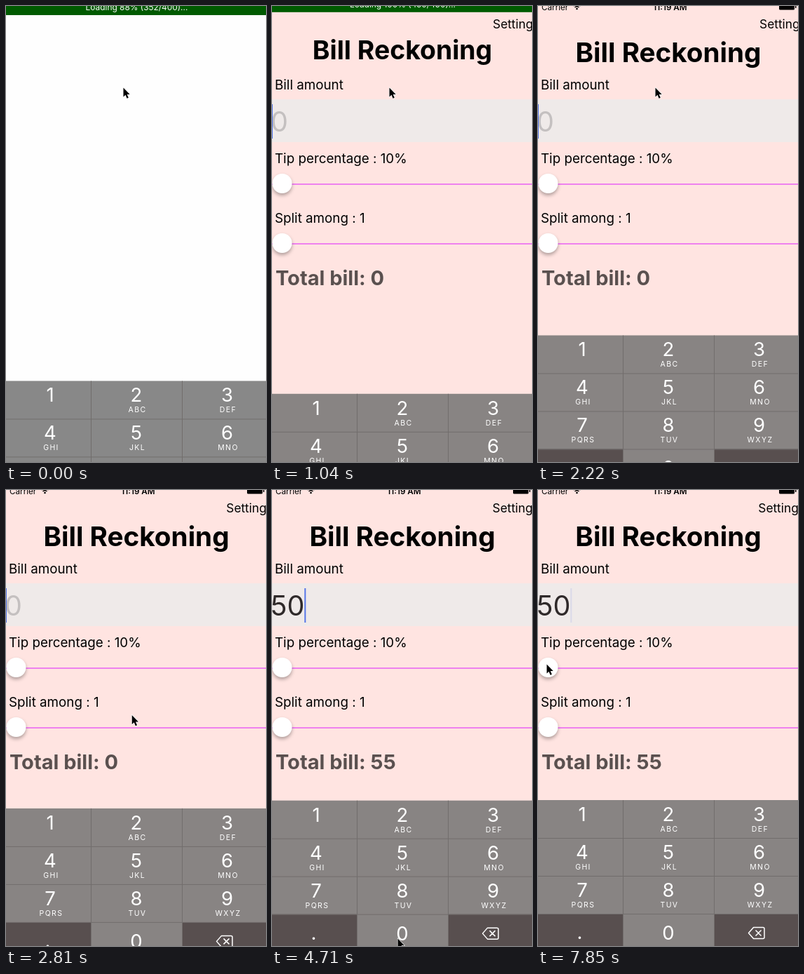
Animation, 371 px wide and 650 px high, one loop 8 s. Source, as an HTML page:

```html
<!DOCTYPE html>
<html lang="en">
<head>
<meta charset="utf-8">
<title>Bill Reckoning</title>
<style>
  html, body { margin: 0; width: 100%; height: 100%; overflow: hidden; background: #fefefe; }
  svg { display: block; width: 371px; height: 650px; font-family: Inter, Roboto, sans-serif; }
  .label { font-size: 18.8px; }
  .thumb { fill: #fff; filter: drop-shadow(0 3px 2.5px rgba(0, 0, 0, .3)); }
  .digit { font-size: 27.5px; fill: #fff; text-anchor: middle; }
  .letters { font-size: 10.5px; letter-spacing: 1.4px; fill: #fff; text-anchor: middle; }
</style>
</head>
<body>
<svg viewBox="0 0 371 650">
  <rect width="371" height="650" fill="#fefefe"/>
  <g id="page">
    <rect width="371" height="650" fill="#ffe4e1"/>
    <g font-size="11.7">
      <text x="5" y="5.5">Carrier</text>
      <text x="188.5" y="5.5" font-weight="600" text-anchor="middle">11:19 AM</text>
      <path d="M50.5 0Q55.5 -4 60.5 0M52.5 2Q55.5 -.5 58.5 2" fill="none" stroke="#000" stroke-width="1.5"/>
      <circle cx="55.5" cy="4" r="1.3"/>
      <rect x="344" y="-4" width="22" height="9.5" rx="1.5"/>
      <rect x="367" y="-1" width="1.5" height="4"/>
    </g>
    <text id="settings" y="32" font-size="17.3">Settings</text>
    <text id="title" text-anchor="middle" font-size="38.7" font-weight="700">Bill Reckoning</text>
    <text class="label" x="4" y="118.5">Bill amount</text>
    <rect y="133" width="371" height="61" fill="#efeae9"/>
    <text id="amount" x="-2" y="178.5" font-size="39.5"></text>
    <rect id="caret" y="140" width="2" height="49" fill="#5677e8"/>
    <text class="label" x="4" y="223.5">Tip percentage : 10%</text>
    <text class="label" x="4" y="308.5">Split among : 1</text>
    <g id="sliders"></g>
    <text id="total" x="5" y="398" font-size="29" font-weight="700" fill="#5a504f"></text>
  </g>
  <g id="loading">
    <rect y="-20" width="371" height="33" fill="#005a00"/>
    <text id="progress" x="186.5" y="6.3" font-size="11.9" fill="#fff" text-anchor="middle"></text>
  </g>
  <g id="keyboard"></g>
  <path id="cursor" d="M.5 1.5V14.5L3.5 11.8L5.6 16.8L7.8 15.8L5.7 11H9.7Z" stroke="#fff" stroke-width="1.2" paint-order="stroke"/>
</svg>
<script>
const $ = id => document.getElementById(id);
const DURATION = 8000, DISMISS = -800, MOUNT = 386, FIRST_KEY = 4050, SECOND_KEY = 4550;

$('sliders').innerHTML = [254, 339].map(y =>
  `<rect y="${y - 1}" width="371" height="2" fill="#ee82ee"/>
   <circle class="thumb" cx="14.5" cy="${y - 1}" r="14"/>`).join('');

function buildKeyboard() {
  const centers = [63, 186, 315.5];
  const letters = ['', 'ABC', 'DEF', 'GHI', 'JKL', 'MNO', 'PQRS', 'TUV', 'WXYZ'];
  const keys = letters.map((word, i) => {
    const x = centers[i % 3], y = Math.floor(i / 3) * 54;
    return `<text class="digit" x="${x}" y="${y + 30}">${i + 1}</text>
            <text class="letters" x="${x + 1.5}" y="${y + 45}">${word}</text>`;
  }).join('');
  $('keyboard').innerHTML = `
    <rect id="keys" width="371" height="216"/>
    <path d="M0 162H121.5V216H0ZM251.5 162H371V216H251.5Z" fill="#584f4f"/>
    <path d="M0 54.5H371M0 108.5H371M0 162.5H371M121.5 0V216M251.5 0V216" stroke="#716d6c"/>
    ${keys}
    <text class="digit" x="59.5" y="198">.</text>
    <text class="digit" x="186" y="199">0</text>
    <path d="M300.5 189.5L307.5 181.5H321Q323 181.5 323 183.5V195.5Q323 197.5 321 197.5H307.5ZM310.5 185.5L318.5 193.5M318.5 185.5L310.5 193.5"
      fill="none" stroke="#fff" stroke-width="1.5" stroke-linejoin="round"/>`;
}

// Pointer stops: time, x, y
const stops = [
  [0, 167, 115], [2450, 167, 115], [3100, 188, 466], [3600, 188, 466],
  [3900, 183, 520], [4130, 183, 520], [4480, 179, 638], [4850, 179, 638],
  [5750, 150, 325], [7020, 150, 325], [7500, 7, 250], [7750, 12, 247], [DURATION, 12, 247]
];

const clamp = v => Math.max(0, Math.min(1, v));
const smooth = v => v * v * (3 - 2 * v);
const move = (id, x, y) => $(id).setAttribute('transform', `translate(${x} ${y})`);

function pointerAt(t) {
  const i = stops.findIndex(s => s[0] > t);
  const [t0, x0, y0] = stops[i - 1], [t1, x1, y1] = stops[i];
  const k = smooth((t - t0) / (t1 - t0));
  return [x0 + (x1 - x0) * k, y0 + (y1 - y0) * k];
}

// Critically damped spring, falling from 1 to 0
function spring(elapsed) {
  const x = Math.max(0, elapsed) * .00182;
  return (1 + x) * Math.exp(-x);
}

// The new keyboard rises while the old one is still sliding away
function keyboardTop(t) {
  return 442 + 216 * (spring(t - MOUNT) - spring(t - DISMISS));
}

function caretOpacity(t) {
  const start = t < SECOND_KEY ? 740 : 230;
  const phase = ((t - start + 1000) % 1000) / 1000;
  return phase < .67 ? 1 - clamp((phase - .5) / .14) : clamp((phase - .7) / .13);
}

function render(t) {
  const mounted = t >= MOUNT;
  $('page').style.display = mounted ? '' : 'none';
  $('keys').setAttribute('fill', mounted ? '#888483' : '#888');
  move('keyboard', 0, keyboardTop(t));
  move('cursor', ...pointerAt(t));

  const k = clamp(t / MOUNT);
  const done = Math.floor(352 + 98 * k), all = Math.floor(400 + 50 * k);
  $('progress').textContent = `Loading ${Math.floor(100 * done / all)}% (${done}/${all})...`;
  move('loading', 0, -13 * clamp((t - 700) / 600) ** 2);
  $('loading').style.display = t < 1300 ? '' : 'none';

  const settle = Math.exp((1040 - t) / 400);
  $('title').setAttribute('transform',
    `translate(186 ${80 - 4 * settle}) scale(${1 - .034 * settle})`);
  $('settings').setAttribute('x', 315.3 + Math.sin((t - 80) / 1000 * 2 * Math.PI));

  const typed = t < FIRST_KEY ? '' : t < SECOND_KEY ? '5' : '50';
  $('amount').textContent = typed || '0';
  $('amount').setAttribute('fill', typed ? '#2f2a2a' : '#c4c0c0');
  $('total').textContent = `Total bill: ${typed * 11 / 10}`;
  $('caret').setAttribute('x', [-1, 23, 46.3][typed.length]);
  $('caret').setAttribute('opacity', caretOpacity(t));
}

buildKeyboard();
const begin = performance.now();
function tick() {
  render((performance.now() - begin) % DURATION);
  requestAnimationFrame(tick);
}
tick();
</script>
</body>
</html>
```
